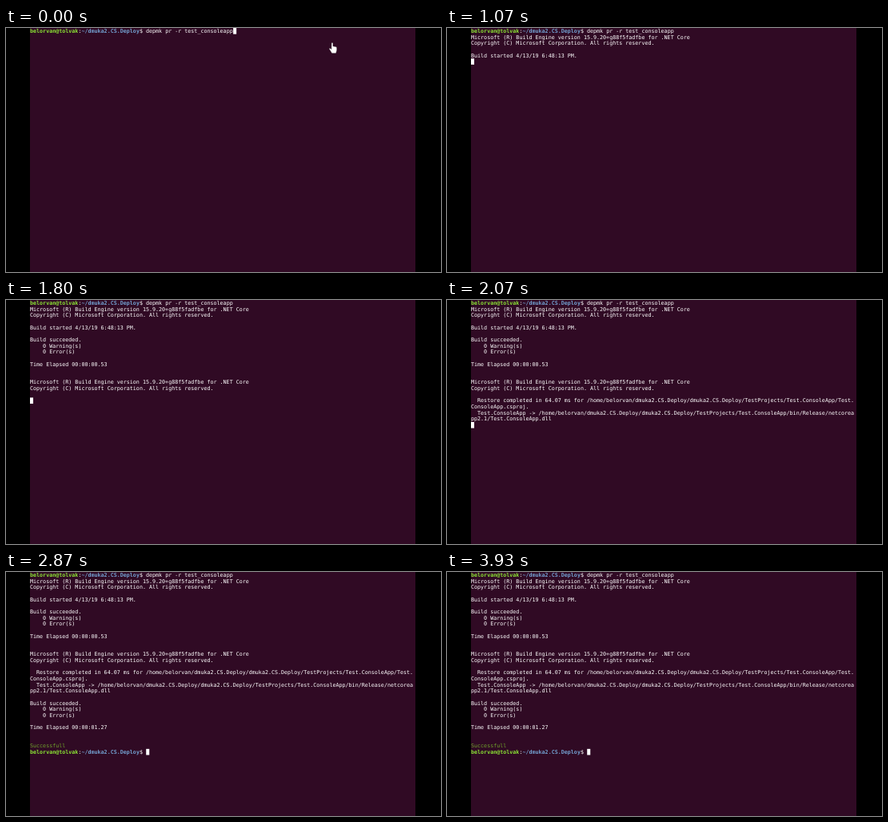
Animation of 544 by 306 pixels, one loop 3.99 s. Source, as an HTML page:

```html
<!DOCTYPE html>
<html lang="en">
<head>
<meta charset="utf-8">
<title>Terminal build</title>
<style>
  html, body { margin: 0; width: 100%; height: 100%; overflow: hidden; background: #000; }
  svg { display: block; width: 100%; height: 100%; }
  text {
    font: 6.7px "DejaVu Sans Mono", monospace;
    fill: #fff;
    white-space: pre;
    text-rendering: geometricPrecision;
  }
  .user { fill: #8ae234; font-weight: bold; }
  .path { fill: #729fcf; font-weight: bold; }
  .done { fill: #6fa22b; }
</style>
</head>
<body>
<svg viewBox="0 0 544 306">
  <rect width="544" height="306" fill="#000"/>
  <rect x="30" width="482" height="306" fill="#300a24"/>
  <g id="screen"></g>
  <rect id="cursor" width="4.03" height="7.65" fill="#fff"/>
  <path id="hand" fill="#fff" stroke="#1c0615" stroke-width=".5" stroke-linejoin="round"
    d="M407 18.6q1.2-1 2 .2v4.1q1-.5 1.6.3 1-.4 1.5.4 1.6-.3 1.7 1.2v3.2l-1.1 3.8h-5.2l-2.6-4.2-.9-1.6q.5-1.2 1.6-.4l1.2 1z"/>
</svg>
<script>
const LOOP = 3990, LEFT = 30, CELL_W = 4.034, CELL_H = 7.65, BASELINE = 6, COLUMNS = 119;
const SVG_NS = "http://www.w3.org/2000/svg";
const screen = document.getElementById("screen");
const cursor = document.getElementById("cursor");
const hand = document.getElementById("hand");

const user = "belorvan";
const project = "dmuka2.CS.Deploy";
const root = `/home/${user}/${project}/${project}/TestProjects/Test.ConsoleApp/`;
const header = [
  "Microsoft (R) Build Engine version 15.9.20+g88f5fadfbe for .NET Core",
  "Copyright (C) Microsoft Corporation. All rights reserved."
];
const summary = elapsed => [
  "Build succeeded.", "    0 Warning(s)", "    0 Error(s)", "", "Time Elapsed " + elapsed
];
const prompt = command => [
  [user + "@tolvak", "user"], [":"], ["~/" + project, "path"], ["$ " + command]
];

// Each output block appears at once: time, first row, lines.
const blocks = [
  [0, 0, [prompt("depmk pr -r test_consoleapp")]],
  [870, 1, header],
  [1000, 4, ["Build started 4/13/19 6:48:13 PM."]],
  [1270, 6, summary("00:00:00.53")],
  [1530, 13, header],
  [1870, 16, wrap(`  Restore completed in 64.07 ms for ${root}Test.ConsoleApp.csproj.`)],
  [2070, 18, wrap(`  Test.ConsoleApp -> ${root}bin/Release/netcoreapp2.1/Test.ConsoleApp.dll`)],
  [2130, 21, summary("00:00:01.27")],
  [2870, 28, [[["Successfull", "done"]], prompt("")]]
];

// Cursor position from each time on: time, row, column; row -1 hides it.
const cursorStops = [
  [0, 0, 63], [330, 1, 0], [600, -1, 0], [870, 3, 0], [1000, 5, 0], [1270, 12, 0],
  [1530, 16, 0], [1870, 18, 0], [2070, 20, 0], [2130, -1, 0], [2200, 28, 0], [2870, 29, 36]
];
const HAND_HIDE = 270;

function wrap(line) {
  return [line.slice(0, COLUMNS), line.slice(COLUMNS)];
}

function add(parent, tag, attributes = {}) {
  const node = document.createElementNS(SVG_NS, tag);
  for (const [key, value] of Object.entries(attributes)) node.setAttribute(key, value);
  return parent.appendChild(node);
}

function drawLine(group, line, row) {
  const text = add(group, "text", { x: LEFT, y: row * CELL_H + BASELINE });
  const spans = typeof line === "string" ? [[line]] : line;
  for (const [content, style = ""] of spans) {
    add(text, "tspan", { class: style }).textContent = content;
  }
}

const groups = blocks.map(([start, row, lines]) => {
  const node = add(screen, "g");
  lines.forEach((line, i) => drawLine(node, line, row + i));
  return { start, node };
});

function show(node, visible) {
  node.setAttribute("visibility", visible ? "visible" : "hidden");
}

function render(time) {
  for (const { start, node } of groups) show(node, time >= start);
  const [, row, column] = cursorStops.filter(([start]) => time >= start).pop();
  show(cursor, row >= 0);
  cursor.setAttribute("x", LEFT + column * CELL_W);
  cursor.setAttribute("y", row * CELL_H);
  show(hand, time < HAND_HIDE);
}

const begin = performance.now();
function tick() {
  render((performance.now() - begin) % LOOP);
  requestAnimationFrame(tick);
}
tick();
</script>
</body>
</html>
```
